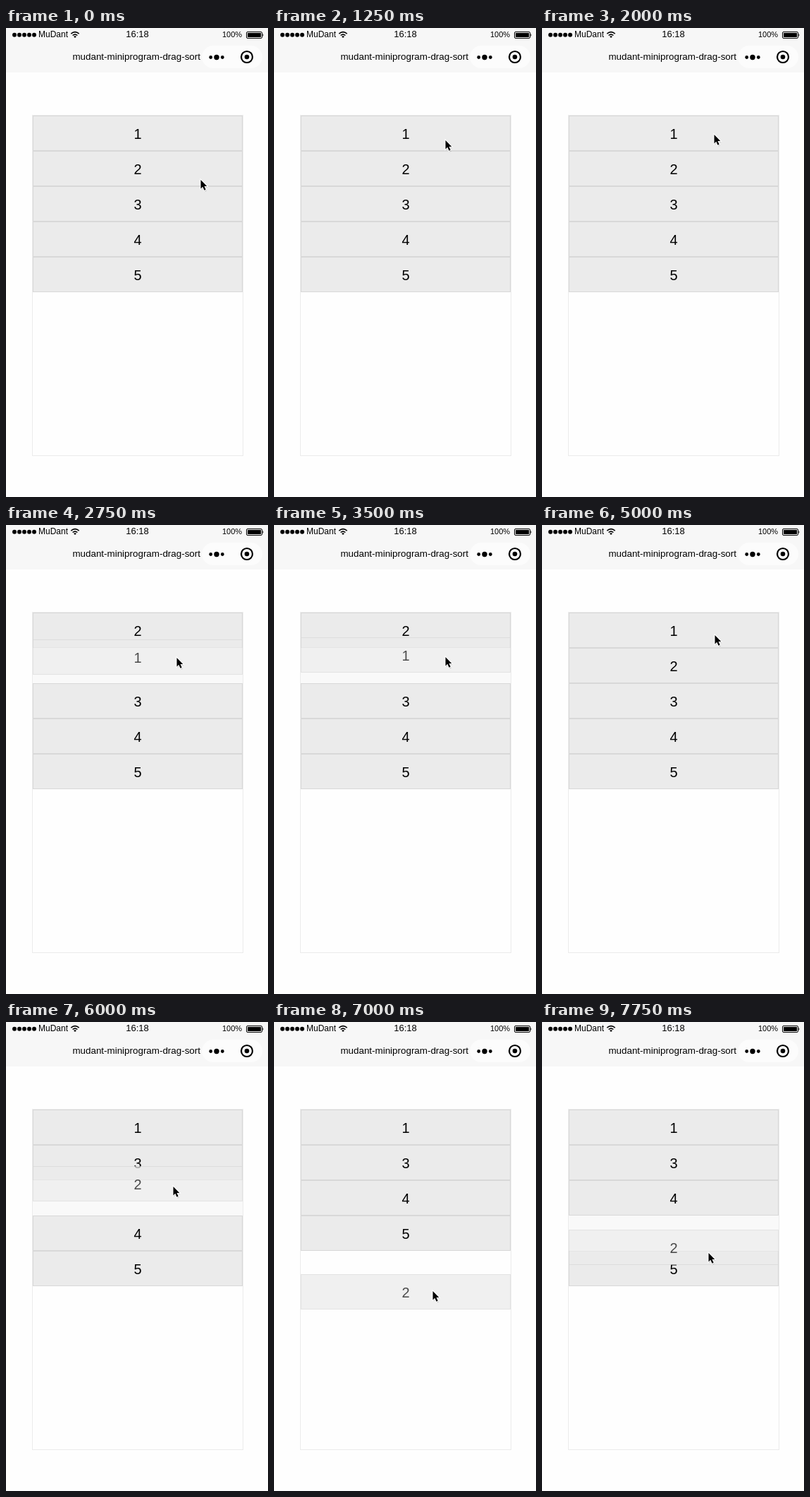
An HTML page for the animation above (8000 ms loop, 372x664 px).

```html
<!DOCTYPE html>
<html lang="en">
<head>
<meta charset="utf-8">
<title>Drag sort</title>
<style>
html, body { margin: 0; width: 372px; height: 664px; overflow: hidden; background: #fefefe; }
body { position: relative; }
svg { position: absolute; left: 0; top: 0; font-family: "Liberation Sans", Arial, sans-serif; }
#list {
  position: absolute; left: 37px; top: 123px; width: 298px; height: 481px;
  border: 1px solid #ebebeb; overflow: hidden; isolation: isolate;
}
#list div { position: absolute; left: 0; top: 0; width: 298px; height: 50px; box-sizing: border-box; }
#list .trail { background: #f9f9f9; }
#list .backing { background: #fefefe; }
#list .item {
  border: 1px solid #d8d8d8; background: #ebebeb; color: #000;
  font: 20px/50px "Liberation Sans", Arial, sans-serif; text-align: center;
}
#list .held { opacity: .7; z-index: 1; }
</style>
</head>
<body>
<svg width="372" height="64">
  <rect width="372" height="63" fill="#f7f7f7"/>
  <rect x="278" y="25" width="86" height="32" rx="16" fill="#fcfcfc"/>
  <g id="signal"></g>
  <text x="46" y="13" font-size="12">MuDant</text>
  <path d="M92.3 8.2Q98 3.2 103.7 8.2M94.6 10.5Q98 7.6 101.4 10.5" fill="none" stroke="#000" stroke-width="1.6"/>
  <path d="M96 12Q98 10.4 100 12L98 14Z"/>
  <text x="186.5" y="13" font-size="13" text-anchor="middle">16:18</text>
  <text x="307" y="13" font-size="11">100%</text>
  <rect x="341.5" y="5.5" width="22" height="9" rx="1.5" fill="none" stroke="#000"/>
  <rect x="343" y="7" width="19" height="6"/>
  <path d="M364.5 8Q366.5 10 364.5 12Z"/>
  <text x="276" y="45" font-size="13.4" text-anchor="end">mudant-miniprogram-drag-sort</text>
  <circle cx="290.7" cy="41.5" r="2.4"/>
  <circle cx="299" cy="41.5" r="3.7"/>
  <circle cx="307.3" cy="41.5" r="2.4"/>
  <circle cx="342" cy="41" r="8" fill="none" stroke="#000" stroke-width="2.2"/>
  <circle cx="342" cy="41" r="3.3"/>
</svg>
<div id="list"></div>
<svg width="372" height="664">
  <g id="cursor">
    <path d="M1 2V14L4 11.5L6 16.5L8.5 15.5L6.3 10.8H10Z" fill="#000" opacity=".18"/>
    <path d="M0 0V12.4L2.8 9.8L5 14.8L7.2 13.8L5 9H8.8Z" stroke="#fff" stroke-width="2" paint-order="stroke"/>
  </g>
</svg>
<script>
const STEP = 250, COUNT = 32, ROW = 50, LIST_TOP = 124;

// Key points of the hand; grip is the cursor's height inside the item it holds.
const path = [
  { at: 0, x: 276, y: 215 },
  { at: 1, x: 291, y: 200 },
  { at: 3, x: 244, y: 150 },
  { at: 4, x: 244, y: 150 },
  { at: 6, x: 241, y: 167 },
  { at: 8, x: 244, y: 151 },
  { at: 11, x: 242, y: 188, grip: 26, item: 0 },
  { at: 13, x: 242, y: 203, grip: 26, item: 0 },
  { at: 16, x: 246, y: 143, grip: 35, item: 0 },
  { at: 20, x: 245, y: 156 },
  { at: 23, x: 238, y: 204 },
  { at: 24, x: 237, y: 233, grip: 29, item: 1 },
  { at: 26, x: 226, y: 381, grip: 24, item: 1 },
  { at: 28, x: 225, y: 381, grip: 24, item: 1 },
  { at: 31, x: 236, y: 327, grip: 33, item: 1 }
];

const list = document.getElementById("list");
const cursor = document.getElementById("cursor");

function addBox(kind, label = "") {
  const box = document.createElement("div");
  box.className = kind;
  box.textContent = label;
  return list.appendChild(box);
}
const numbers = [1, 2, 3, 4, 5];
const trails = numbers.map(() => addBox("trail"));
const backing = addBox("backing");
const items = numbers.map(n => addBox("item", n));

document.getElementById("signal").innerHTML =
  numbers.map(n => `<circle cx="${5 + 7 * n}" cy="9.7" r="3"/>`).join("");

const smooth = t => t * t * (3 - 2 * t);

function handAt(step) {
  const from = path.filter(p => p.at <= step).pop();
  const to = path.find(p => p.at > step) || from;
  const t = to === from ? 0 : smooth((step - from.at) / (to.at - from.at));
  const mix = (key) => from[key] + ((to[key] ?? from[key]) - from[key]) * t;
  return { x: mix("x"), y: mix("y"), grip: mix("grip"), item: from.item ?? -1 };
}

function stateAt(step) {
  const { x, y, grip, item: held } = handAt(step);
  const top = Math.round(y - grip) - LIST_TOP;
  const order = [0, 1, 2, 3, 4];
  if (held >= 0) {
    const slot = Math.max(0, Math.min(4, Math.round(top / ROW)));
    order.splice(held, 1);
    order.splice(slot, 0, held);
  }
  const tops = items.map((_, i) => i === held ? top : order.indexOf(i) * ROW);
  return { x, y, held, tops };
}

const place = (box, y) => { box.style.transform = `translateY(${y}px)`; };

// Rows just left keep a faint trail for one step.
function draw(step) {
  const now = stateAt(step), before = stateAt(Math.max(0, step - 1));
  items.forEach((item, i) => {
    place(item, now.tops[i]);
    item.classList.toggle("held", i === now.held);
    place(trails[i], before.tops[i]);
  });
  place(backing, now.tops[Math.max(0, now.held)]);
  cursor.setAttribute("transform", `translate(${Math.round(now.x) + .5} ${Math.round(now.y)})`);
}

function tick() {
  draw(Math.floor(performance.now() / STEP) % COUNT);
  requestAnimationFrame(tick);
}
tick();
</script>
</body>
</html>
```
